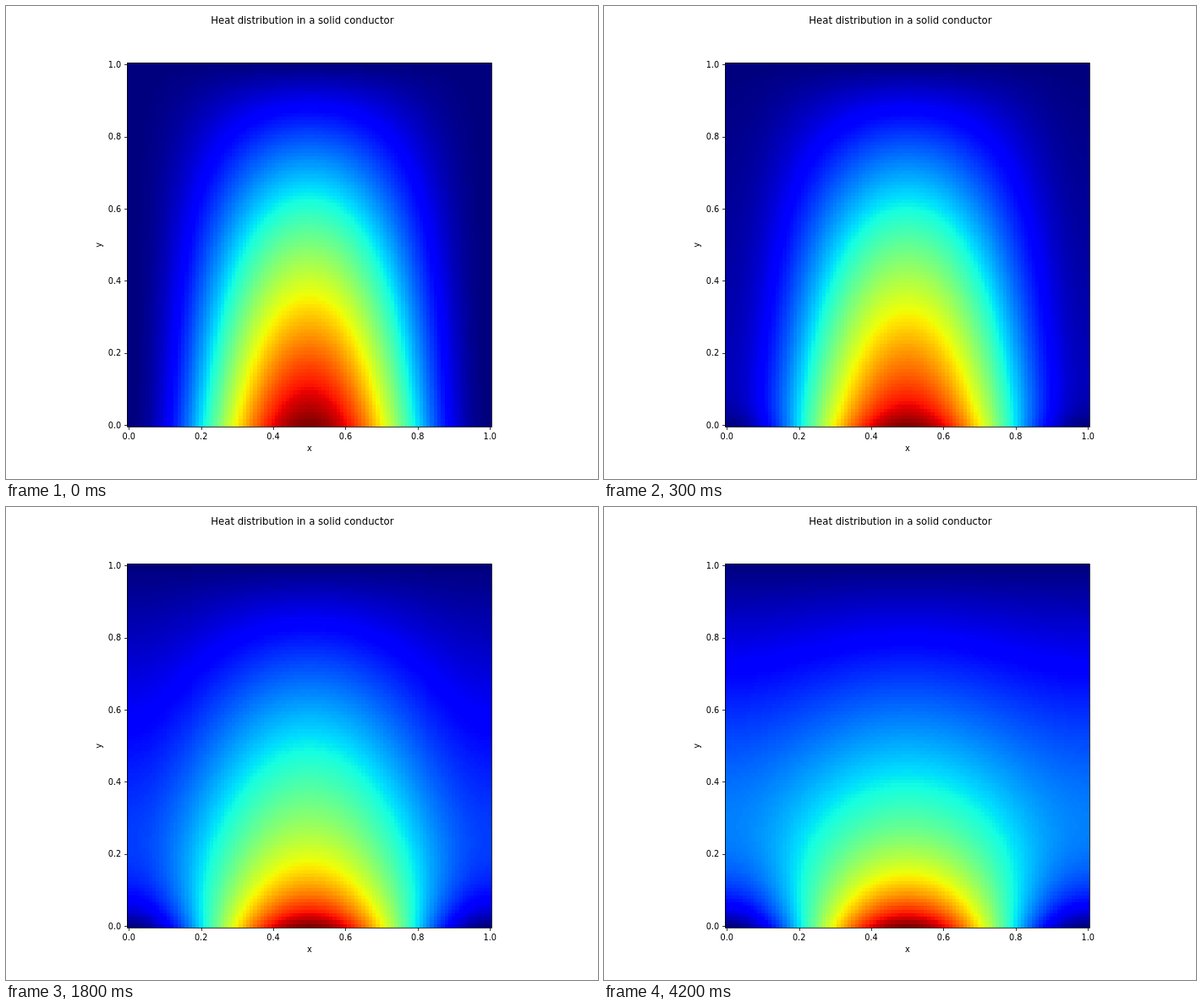
An HTML page with a canvas for the animation above (5100 ms loop, 700 by 560 pixels).

```html
<!DOCTYPE html>
<html lang="en">
<head>
<meta charset="utf-8">
<title>Heat distribution</title>
<style>
  html, body { margin: 0; width: 100%; height: 100%; overflow: hidden; background: #fff; }
  canvas { position: absolute; left: 143px; top: 67px; width: 431px; height: 431px; image-rendering: pixelated; }
  svg { position: absolute; left: 0; top: 0; }
  text { font: 9.722px "DejaVu Sans", sans-serif; text-anchor: middle; }
  .title { font-size: 11.667px; }
  .yTick { text-anchor: end; }
  path { fill: none; stroke: #000; stroke-width: .8; }
</style>
</head>
<body>
<canvas id="field" width="101" height="101"></canvas>
<svg id="axes" width="700" height="560">
  <text class="title" x="350.4" y="21">Heat distribution in a solid conductor</text>
  <text x="358.8" y="527">x</text>
  <text transform="translate(113 282.8) rotate(-90)">y</text>
  <path d="M143.5 67.5H574.5V498.5H143.5Z"/>
</svg>
<script>
const N = 101, LOOP = 5100, STEP = 100, MODES = 40;
const DIFFUSION = 0.00111; // diffusivity times the time per step
const { PI, sin, cos, sinh, exp, floor, min, max } = Math;

const axes = document.getElementById('axes');
const ctx = document.getElementById('field').getContext('2d');
const image = ctx.createImageData(N, N);

function add(tag, attrs, text = '') {
  const node = document.createElementNS('http://www.w3.org/2000/svg', tag);
  for (const key in attrs) node.setAttribute(key, attrs[key]);
  node.textContent = text;
  axes.append(node);
}

for (let i = 0; i <= 5; i++) {
  const label = (i / 5).toFixed(1);
  const x = 145.28 + i * 85.39, y = 496.27 - i * 85.39;
  add('path', { d: `M${floor(x + .5) + .5} 498.5v3.4M143.5 ${floor(y + .5) + .5}h-3.4` });
  add('text', { x, y: 513 }, label);
  add('text', { x: 136.2, y: Math.round(y + 3.6), class: 'yTick' }, label);
}

// Colour ramp: dark blue, blue, cyan, yellow, red, dark red
const ramp = (v, a, b) => min(1, max(0, (v - a) / (b - a)));
const palette = Array.from({ length: 256 }, (_, i) => {
  const v = i / 255;
  return [
    ramp(v, .35, .66) - ramp(v, .89, 1) / 2,
    ramp(v, .125, .375) - ramp(v, .64, .91),
    .5 + ramp(v, 0, .11) / 2 - ramp(v, .34, .65)
  ].map(c => floor(c * 255));
});

// Cosine-mode amplitude at height y: steady profile plus decaying sine modes
function amplitude(y, step) {
  let sum = sinh(2 * PI * (1 - y)) / sinh(2 * PI);
  for (let n = 1; n <= MODES; n++) {
    const k = n * n + 4;
    sum += 8 / (PI * n * k) * exp(-DIFFUSION * PI * PI * k * step) * sin(n * PI * y);
  }
  return sum;
}

function draw(step) {
  for (let row = 0, p = 0; row < N; row++) {
    const y = 1 - row / (N - 1);
    const g = amplitude(y, step);
    for (let col = 0; col < N; col++, p += 4) {
      const heat = (1 - y - cos(2 * PI * col / (N - 1)) * g) / 2;
      const index = min(255, max(0, floor(heat * 256 + 1e-6)));
      image.data.set(palette[index], p);
      image.data[p + 3] = 255;
    }
  }
  ctx.putImageData(image, 0, 0);
}

let shown = -1;
function tick() {
  const step = floor(performance.now() % LOOP / STEP);
  if (step !== shown) draw(shown = step);
  requestAnimationFrame(tick);
}
tick();
</script>
</body>
</html>
```
